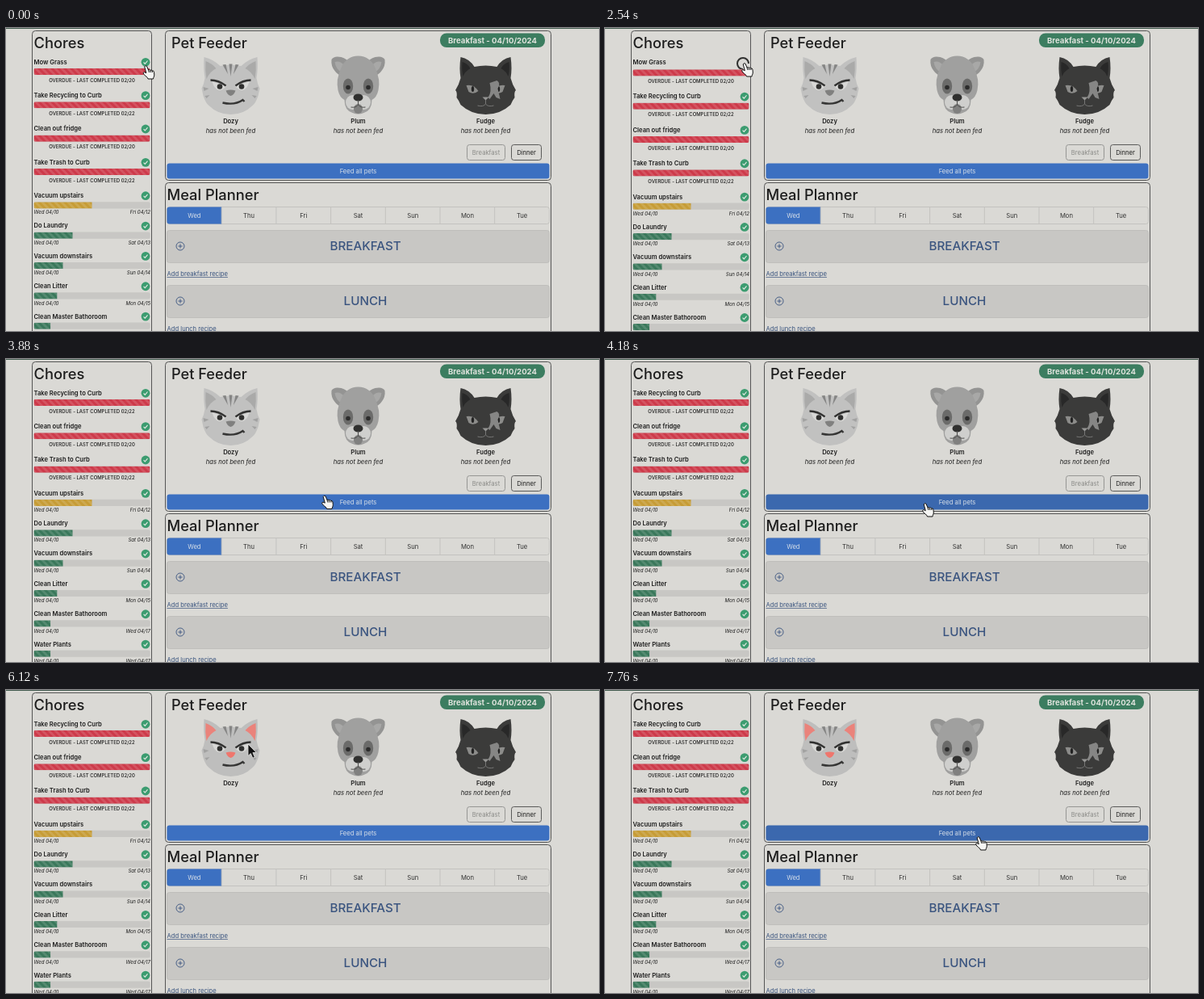
An HTML page with a canvas that plays this animation: 735 by 375 pixels, repeating every 8000 ms.

```html
<!DOCTYPE html>
<html lang="en">
<head>
<meta charset="utf-8">
<title>Household dashboard</title>
<style>
  html, body { margin: 0; width: 100%; height: 100%; overflow: hidden; background: #dad9d5; }
  canvas { display: block; }
</style>
</head>
<body>
<canvas id="stage" width="735" height="375"></canvas>
<script>
const c = document.getElementById('stage').getContext('2d');
const LOOP = 8000, INK = '#1d1d1d', NAVY = '#3a547f', GREEN = '#3c7d60', BLUE = '#3c70c1';

// Pointer: start time, left, top, hand (1) or arrow (0); each entry holds until the next.
const pointer = [
  [0, 169.5, 46, 1], [1340, 169, 43, 1], [2990, 168.5, 43, 1], [3280, 258, 96, 0], [3430, 333, 143, 0],
  [3730, 372, 159, 0], [3880, 391, 168.5, 1], [4030, 392, 174, 1], [4180, 393, 178, 1],
  [5380, 300, 67, 0], [6130, 318, 80, 0], [6280, 376, 122, 0], [6430, 430, 153, 0], [6570, 449, 164, 0],
  [7020, 452, 186, 1], [7170, 457, 181, 1], [7470, 458, 181, 1], [7620, 459, 181, 1]
];

// Late chores carry a last-done date; the others a due date and a share of the bar.
const chores = [
  { name: 'Mow Grass', late: '02/20' },
  { name: 'Take Recycling to Curb', late: '02/22' },
  { name: 'Clean out fridge', late: '02/20' },
  { name: 'Take Trash to Curb', late: '02/22' },
  { name: 'Vacuum upstairs', due: 'Fri 04/12', part: 1 / 2, color: '#c69c36' },
  { name: 'Do Laundry', due: 'Sat 04/13', part: 1 / 3 },
  { name: 'Vacuum downstairs', due: 'Sun 04/14', part: 1 / 4 },
  { name: 'Clean Litter', due: 'Mon 04/15', part: 1 / 5 },
  { name: 'Clean Master Bathoroom', due: 'Wed 04/17', part: 1 / 7 },
  { name: 'Water Plants', due: 'Wed 04/17', part: 1 / 7 }
];

function text(s, x, y, size, { align = 'left', style = '400', color = INK } = {}) {
  c.font = `${style} ${size}px Inter, sans-serif`;
  c.textAlign = align;
  c.fillStyle = color;
  c.fillText(s, x, y + size * 0.36);
}

function box(x, y, w, h, r, fill, stroke) {
  c.beginPath();
  c.roundRect(x, y, w, h, r);
  if (fill) { c.fillStyle = fill; c.fill(); }
  if (stroke) { c.strokeStyle = stroke; c.lineWidth = 1; c.stroke(); }
}

function disc(x, y, rx, fill, ry = rx) {
  c.beginPath();
  c.ellipse(x, y, rx, ry, 0, 0, 7);
  c.fillStyle = fill;
  c.fill();
}

function shape(d, fill, stroke, width = 1) {
  const p = new Path2D(d);
  if (fill) { c.fillStyle = fill; c.fill(p); }
  if (stroke) { c.strokeStyle = stroke; c.lineWidth = width; c.stroke(p); }
}

function at(x, y, draw, flip = 1) {
  c.save();
  c.translate(x, y);
  c.scale(flip, 1);
  draw();
  c.restore();
}

const bothSides = draw => [1, -1].forEach(flip => at(0, 0, draw, flip));

function bar(y, part, color) {
  box(34.5, y, 144, 8.2, 2, '#c8c7c4');
  c.save();
  c.beginPath();
  c.roundRect(34.5, y, 144, 8.2, 2);
  c.clip();
  c.beginPath();
  c.rect(34.5, y, 144 * part, 8.2);
  c.clip();
  c.fillStyle = color;
  c.fillRect(34, y, 145, 9);
  for (let x = 26.5; x < 180; x += 8) shape(`M${x} ${y}h4l8.2 8.2h-4z`, 'rgba(255,255,255,.13)');
  c.restore();
}

function check(y) {
  disc(173, y, 5.4, '#3c9c70');
  shape(`M170.6 ${y + .2}l1.7 1.8 3.2-3.8`, null, '#e6ebe5', 1.1);
}

function spinner(y, t) {
  const a = Math.floor((t - 2540) / 150) * Math.PI * 0.4;
  c.beginPath();
  c.arc(171, y, 7, a + Math.PI / 2, a + Math.PI * 2);
  c.strokeStyle = '#30302f';
  c.lineWidth = 2;
  c.stroke();
}

function choreList(t) {
  box(32.5, 3.5, 148, 390, 4, null, '#555');
  text('Chores', 34.5, 18, 18.3, { style: '500' });
  let y = 42;
  for (const chore of chores.slice(t < 3130 ? 0 : 1)) {
    const busy = chore === chores[0] && t >= 2540 && t < 2990;
    text(chore.name, 34.5, y, 7.6, { style: '600' });
    if (busy) spinner(y + 2, t); else check(y + .3);
    if (busy) y += 1.4;
    bar(y + 7.8, chore.part || 1, chore.late ? '#cd3a4a' : chore.color || '#3a785b');
    if (chore.late) {
      text('OVERDUE - LAST COMPLETED ' + chore.late, 106.5, y + 22.5, 5.95, { align: 'center', style: '500' });
      y += 41.35;
    } else {
      text('Wed 04/10', 34.5, y + 20.9, 6.1, { style: 'italic 400' });
      text(chore.due, 179, y + 20.9, 6.1, { style: 'italic 400', align: 'right' });
      y += 37.35;
    }
  }
}

function catHead(fur, ear) {
  shape('M-33 36Q-21 39-13 47Q0 44 13 47Q21 39 33 36Q34 50 32 62Q33 69 36 75Q35 79 34 84Q31 93 27 96Q16 107 0 107Q-16 107-27 96Q-31 93-34 84Q-35 79-36 75Q-33 69-32 62Q-34 50-33 36Z', fur);
  bothSides(() => shape('M-31 41Q-23 44-18 50Q-26 54-30 63Q-32 52-31 41Z', ear));
}

function tabby(fed) {
  catHead(fed ? '#bebebd' : '#c1c1c0', fed ? '#ea837b' : '#aaaaa9');
  shape('M-2 44.5H2L0 60Z', '#858584');
  bothSides(() => {
    shape('M-10 45.5L-6 45L-3.5 57Z', '#858584');
    shape('M-34 73l7 2-6 3zM-32 84l6-1-4 4z', '#a2a2a1');
    shape('M-23 66L-6 72Q-9 77-15 77Q-21 75-23 66Z', '#d8d8d6');
    disc(-13.5, 72.5, 3.3, '#30302f');
    shape('M-25 64.5Q-15 64.5-6 71.5', null, '#30302f', 2.4);
  });
  shape('M-6 77.5Q0 75.5 6 77.5Q4 83 0 84Q-4 83-6 77.5Z', fed ? '#ef766d' : '#80807f');
  shape('M-10 92.5Q5 96 15 89l2 2', null, '#353534', 2.4);
}

function dog() {
  bothSides(() => {
    shape('M-33 39Q-30 34-21 36Q-14 38-10 44L-18 60Q-26 58-29 53Q-34 47-33 39Z', '#949493');
    shape('M-29 42Q-22 40-17 47L-20 55Q-28 51-29 42Z', '#a8a8a7');
  });
  shape('M-21 49Q-15 35 0 34.5Q15 35 21 49Q28 64 25 77Q23 86 17 89Q17 102 7 105Q0 108-7 105Q-17 102-17 89Q-23 86-25 77Q-28 64-21 49Z', '#a0a09f');
  bothSides(() => {
    disc(-12.5, 72, 6.2, '#6b6b6a', 9.5);
    disc(-12.5, 73.5, 2.8, '#2c2c2c');
    disc(-7, 92, 8.5, '#cfcfcd', 9);
  });
  disc(0, 100, 5.5, '#80807f', 6);
  disc(0, 86, 6, '#30302f', 4.5);
  shape('M0 89v6M-9 98Q-3 99 0 95Q3 99 9 98', null, '#4c4c4b');
}

function blackCat() {
  shape('M-31 36Q-20 38-14 48Q0 45 14 48Q20 38 31 36Q33 50 31 62Q33 70 37.5 77Q35 79 36 86Q33 90 31 95Q18 107 0 107Q-18 107-31 95Q-33 90-36 86Q-35 79-37.5 77Q-33 70-31 62Q-33 50-31 36Z', '#3b3b3a');
  bothSides(() => {
    shape('M-29 42Q-22 44-19 50Q-26 54-28 60Q-30 52-29 42Z', '#282828');
    shape('M-24 71Q-15 69-9 78Q-15 83-21 79Z', '#8c8c8a');
    disc(-16, 75.5, 1.7, '#222', 3.5);
  });
  shape('M5 68L14 65Q19 68 15 75L18 88L13 86L10 81L5 88L3 86Q8 79 5 68Z', '#868685');
  shape('M-4 85.5H4L0 89.5Z', '#969694');
  shape('M0 89v5M-10 96Q-3 98 0 94Q3 98 10 96', null, '#777776');
}

function petFeeder(t) {
  const fed = t >= 5980;
  const hover = (t >= 4030 && t < 5530) || t >= 7320;
  const mid = { align: 'center' };
  box(197.5, 3.5, 478, 185, 4, null, '#555');
  text('Pet Feeder', 205, 18.2, 18.2, { style: '500' });
  box(538, 6.5, 130, 17.5, 8, GREEN);
  text('Breakfast - 04/10/2024', 603, 15.4, 9.6, { align: 'center', style: '700', color: '#dfe3dd' });
  [['Dozy', 278.5, () => tabby(fed)], ['Plum', 436.5, dog], ['Fudge', 594.5, blackCat]].forEach(([name, x, draw], i) => {
    at(x, 0, draw);
    text(name, x, 114.9, 7.6, { align: 'center', style: '600' });
    if (i || !fed) text('has not been fed', x, 127, 7.7, { align: 'center', style: 'italic 400' });
  });
  box(571.5, 144.5, 47, 19, 3, null, '#969694');
  text('Breakfast', 595, 154, 7.65, { ...mid, color: '#8a8a87' });
  box(626.5, 144.5, 37, 19, 3, null, '#5a5a59');
  text('Dinner', 645, 154, 7.65, mid);
  box(199.5, 167.5, 474, 19, 3, hover ? '#3b68ae' : BLUE);
  text('Feed all pets', 436.5, 177, 7.65, { ...mid, color: '#d7dfe8' });
}

function meal(name, y) {
  box(199.5, y - 19.5, 474, 40, 3, '#c8c7c4', '#bfbebb');
  text(name.toUpperCase(), 445.5, y - .8, 15.2, { align: 'center', style: '500', color: NAVY });
  shape(`M221 ${y}a5 5 0 1 0-10 0a5 5 0 1 0 10 0M213.4 ${y}h5.2M216 ${y - 2.6}v5.2`, null, NAVY, .9);
  const link = `Add ${name} recipe`;
  text(link, 199.5, y + 34.7, 7.65, { color: NAVY });
  c.fillRect(199.5, y + 38.3, c.measureText(link).width, .7);
}

function mealPlanner() {
  box(197.5, 191.5, 478, 200, 4, null, '#555');
  text('Meal Planner', 199.5, 206, 18.3, { style: '500' });
  box(199.5, 221.5, 474, 21, 3, null, '#c3c2bf');
  'Wed Thu Fri Sat Sun Mon Tue'.split(' ').forEach((day, i) => {
    const x = 199.5 + i * 67.7;
    if (i) shape(`M${x} 222v20`, null, '#c3c2bf');
    else box(x, 221.5, 67.7, 21, [3, 0, 0, 3], BLUE);
    text(day, x + 33.9, 232, 7.65, { align: 'center', color: i ? '#333' : '#d7dfe8' });
  });
  meal('breakfast', 270);
  meal('lunch', 338);
}

function drawPointer(t) {
  const [, x, y, hand] = pointer.findLast(p => p[0] <= t);
  at(x, y, () => hand
    ? shape('M2.2 2Q3-.3 5 1.2L7 6Q8.2 5 9.2 6.3Q10.6 5.3 11.6 6.8Q13.4 6.3 14 8.5L14.3 12Q14.2 14 13.3 15.5L13 17H6.5L6 15.6Q3.5 13.5 1 11Q-.3 9 2 8.6L4.3 9.7ZM7 6L8 9M9.2 6.3L10 9M11.6 6.8L12 9', '#f5f5f3', '#111')
    : shape('M0 0V14.5L3.3 11.5L5.8 17.2L8.3 16.1L5.9 10.6L10.4 10.5Z', '#111', '#e8e8e5', .8));
}

function frame(now) {
  const t = now % LOOP;
  c.fillStyle = '#dad9d5';
  c.fillRect(0, 0, 735, 375);
  c.fillStyle = '#435c50';
  c.fillRect(0, 0, 735, 1);
  choreList(t);
  petFeeder(t);
  mealPlanner();
  drawPointer(t);
  requestAnimationFrame(frame);
}
frame(0);
</script>
</body>
</html>
```
